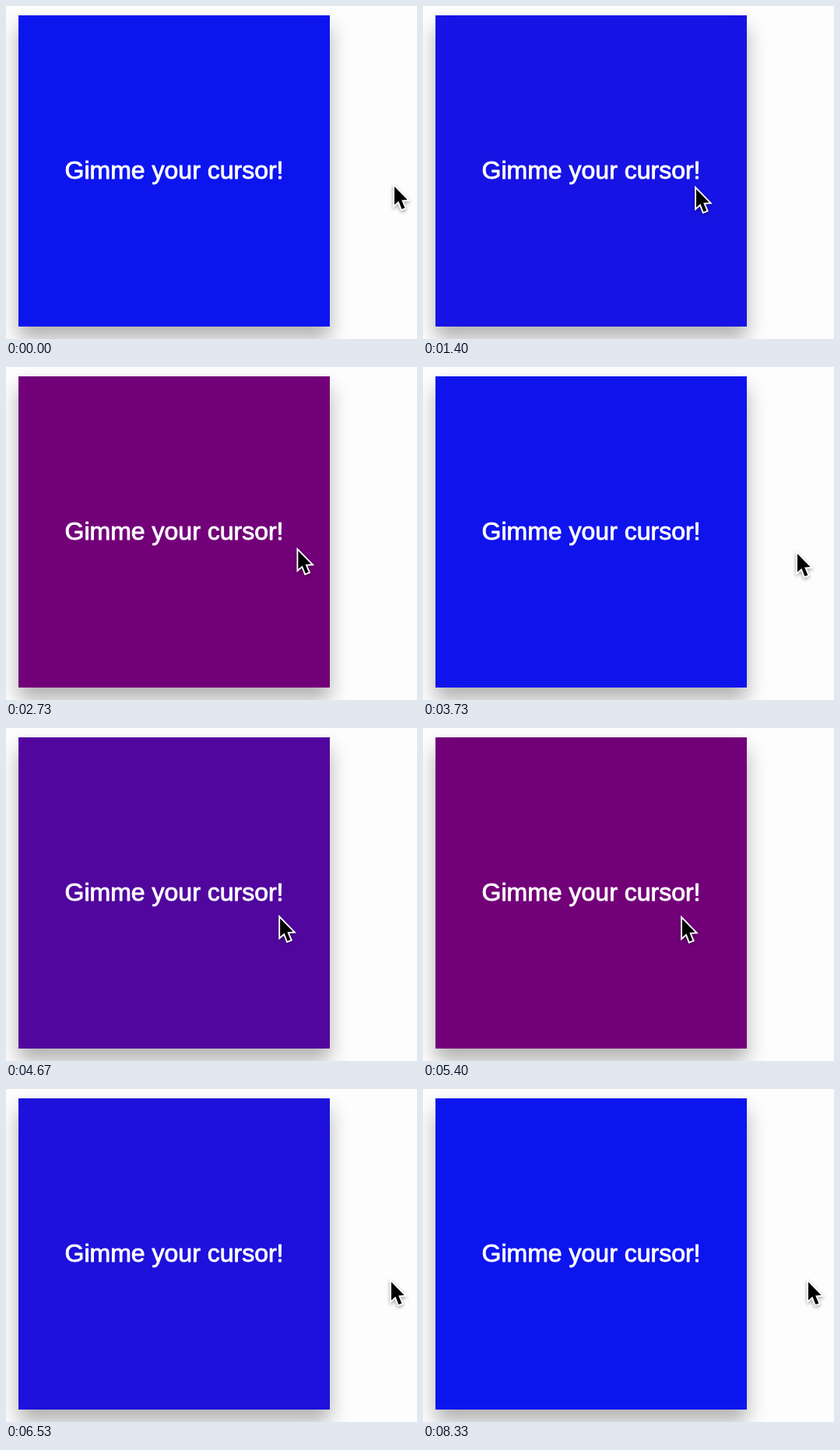
These frames come from a looping animation (528x428 px, 8.39 s). An HTML page with a canvas:

```html
<!DOCTYPE html>
<html lang="en">
<head>
<meta charset="utf-8">
<title>Hover card</title>
<style>
  html, body { margin: 0; width: 528px; height: 428px; overflow: hidden; background: #fdfdfd; }
  canvas { display: block; }
</style>
</head>
<body>
<canvas id="stage" width="528" height="428"></canvas>
<script>
const ctx = document.getElementById('stage').getContext('2d');
const LOOP = 8390;
const STEP = 1000 / 15;
const FADE = 1000;
const BLUE = [13, 21, 239];
const PURPLE = [114, 0, 120];
const LABEL = 'Gimme your cursor!';
const ARROW = new Path2D('M0 0V23.5L5.4 18.8L9.4 29L13.4 27.4L9.2 17.4L16.6 17Z');

const mix = (a, b, k) => a + (b - a) * k;
const clamp = k => Math.min(1, Math.max(0, k));
const easeIn = power => k => k ** power;
const easeOut = power => k => 1 - (1 - k) ** power;
const smooth = k => k * k * (3 - 2 * k);

const HOME = { x: 499, y: 232 };
const MOVES = [
  { from: 400, to: 533, x: 485, y: 234, curve: smooth },
  { from: 880, to: 1400, x: 351, y: 235.5, curve: easeIn(2.5) },
  { from: 2655, to: 3450, x: 481, y: 240, curve: easeOut(2) },
  { from: 3950, to: 5400, x: 333, y: 245.5, curve: easeOut(3) },
  { from: 5610, to: 6450, x: 495, y: 248, curve: smooth }
];

// The pointer enters and leaves the card alternately
const CROSSINGS = [1300, 2950, 4270, 6005];

// CSS "ease": cubic-bezier(.25, .1, .25, 1)
function cssEase(x) {
  const bezier = (p, q, u) => 3 * p * u * (1 - u) ** 2 + 3 * q * u * u * (1 - u) + u ** 3;
  let low = 0, high = 1;
  for (let i = 0; i < 24; i++) {
    const mid = (low + high) / 2;
    if (bezier(0.25, 0.25, mid) < x) low = mid; else high = mid;
  }
  return bezier(0.1, 1, low);
}

function pointerAt(t) {
  return MOVES.reduce((at, move) => {
    const k = move.curve(clamp((t - move.from) / (move.to - move.from)));
    return { x: mix(at.x, move.x, k), y: mix(at.y, move.y, k) };
  }, HOME);
}

function cardColor(t) {
  const purple = CROSSINGS.reduce((sum, at, i) =>
    sum + (i % 2 ? -1 : 1) * cssEase(clamp((t - at) / FADE)), 0);
  return `rgb(${BLUE.map((c, i) => Math.round(mix(c, PURPLE[i], purple)))})`;
}

function setShadow(alpha, offset, blur) {
  ctx.shadowColor = `rgba(0,0,0,${alpha})`;
  ctx.shadowOffsetY = offset;
  ctx.shadowBlur = blur;
}

function drawCard(t) {
  ctx.save();
  setShadow(0.3, 16, 24);
  ctx.fillStyle = cardColor(t);
  ctx.fillRect(16, 12, 400, 400);
  ctx.restore();

  ctx.font = '32px "Liberation Sans", Arial, sans-serif';
  ctx.textAlign = 'center';
  ctx.lineJoin = 'round';
  ctx.fillStyle = ctx.strokeStyle = '#fff';
  ctx.lineWidth = 0.9;
  ctx.fillText(LABEL, 216, 222);
  ctx.strokeText(LABEL, 216, 222);
}

function drawPointer(t) {
  const { x, y } = pointerAt(t);
  ctx.save();
  ctx.translate(x, y);
  ctx.save();
  setShadow(0.35, 2, 4);
  ctx.lineJoin = 'miter';
  ctx.strokeStyle = '#fff';
  ctx.lineWidth = 3.8;
  ctx.stroke(ARROW);
  ctx.restore();
  ctx.fillStyle = '#000';
  ctx.fill(ARROW);
  ctx.restore();
}

const start = performance.now();

function frame() {
  const elapsed = (performance.now() - start) % LOOP;
  const t = Math.floor((elapsed + 5) / STEP) * STEP;
  ctx.fillStyle = '#fdfdfd';
  ctx.fillRect(0, 0, 528, 428);
  drawCard(t);
  drawPointer(t);
  requestAnimationFrame(frame);
}
frame();
</script>
</body>
</html>
```
